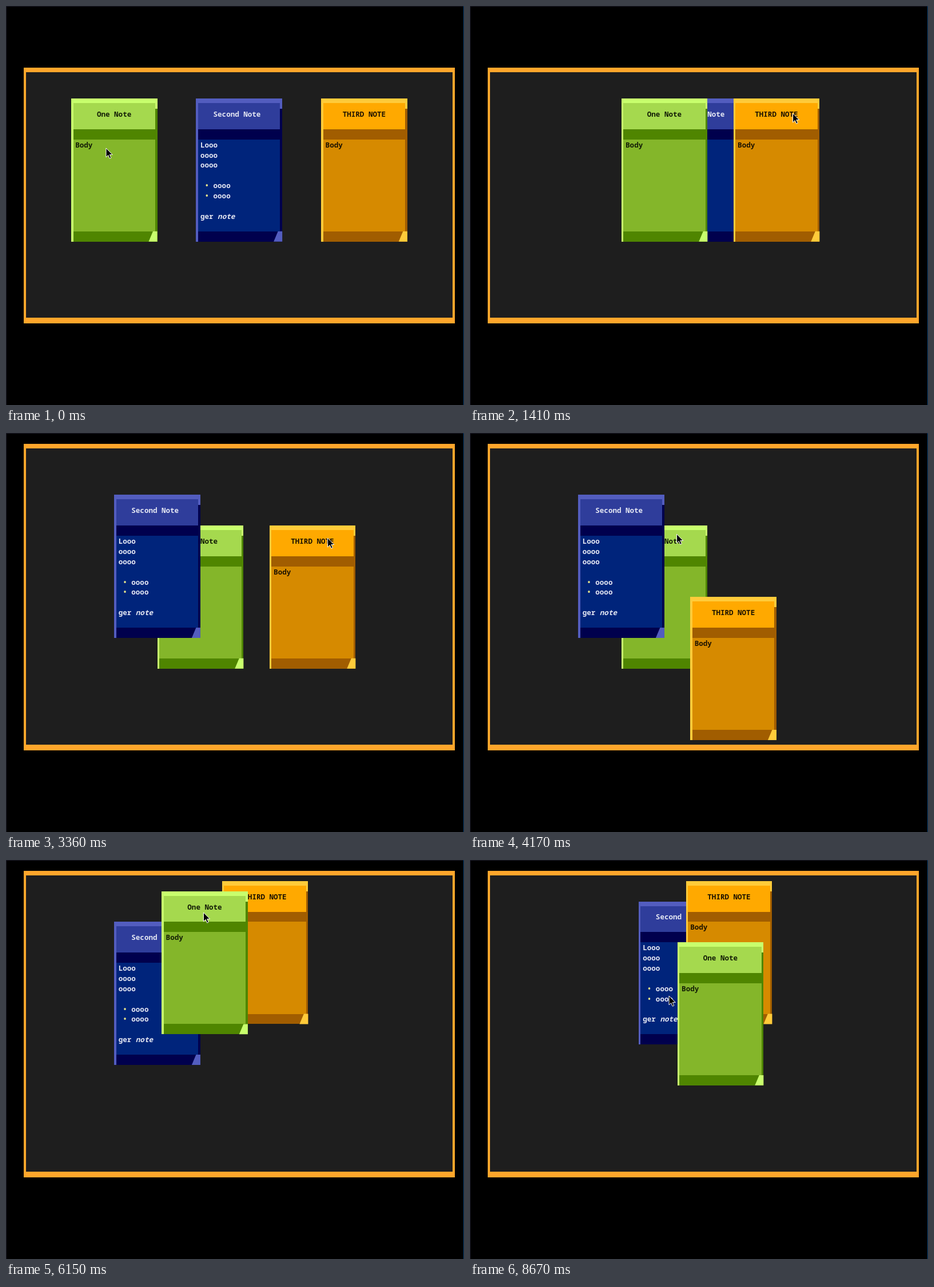
These frames come from a looping animation (801x699 px, 8700 ms). An HTML page:

```html
<!DOCTYPE html>
<html lang="en">
<head>
<meta charset="utf-8">
<title>Sticky notes</title>
<style>
  html, body { margin: 0; width: 100%; height: 100%; overflow: hidden; background: #000; }
  svg { display: block; width: 801px; height: 699px; }
  rect { shape-rendering: crispEdges; }
  text { font: bold 12.56px "Noto Sans Mono", "DejaVu Sans Mono", monospace; }
  .italic { font-style: italic; }
</style>
</head>
<body>
<svg id="stage" viewBox="0 0 801 699"></svg>
<script>
const LOOP = 8700, STEP = 30;
const CELL = [7.54, 17.9], ORIGIN = [0.65, 1];
const HALF = 0.45; // height of the half-block glyphs, in rows
const LAG = 105;   // the notes trail the pointer
const stage = document.getElementById('stage');

function add(parent, tag, attrs, content) {
  const node = document.createElementNS('http://www.w3.org/2000/svg', tag);
  for (const key in attrs) node.setAttribute(key, attrs[key]);
  if (content) node.textContent = content;
  return parent.appendChild(node);
}

const toPixels = cell => cell.map((n, axis) => ORIGIN[axis] + n * CELL[axis]);
const place = (node, [x, y]) => node.setAttribute('transform', `translate(${x} ${y})`);

// Positions and sizes are in terminal cells.
function box(parent, col, row, cols, rows, fill) {
  return add(parent, 'rect', {
    x: col * CELL[0], y: row * CELL[1], width: cols * CELL[0], height: rows * CELL[1], fill
  });
}

function write(parent, col, row, content, fill, style = '') {
  add(parent, 'text', { x: col * CELL[0], y: row * CELL[1] + 14, fill, class: style }, content);
}

function makeNote(layer, { light, title, dark, body, ink, heading, lines }) {
  const g = add(layer, 'g', {});
  box(g, 0, 0, 20, 14, dark);
  box(g, 0, 0, 20, HALF, light);
  box(g, 0, 0, 0.5, 14, light);
  box(g, 19.5, 0, 0.5, 1, light);
  box(g, 0.5, HALF, 19, 3 - HALF, title);
  box(g, 0.5, 4, 19, 9, body);
  const [w, h] = CELL;
  add(g, 'path', { d: `M${19 * w} ${13 * h}H${20 * w}V${14 * h}H${18 * w}Z`, fill: light });
  write(g, Math.floor((20 - heading.length) / 2), 1, heading, ink);
  lines.forEach((line, i) => {
    if (line.startsWith('•')) {
      write(g, 2, 4 + i, '•', '#e6e58a');
      write(g, 4, 4 + i, line.slice(2), ink);
    } else {
      const [plain, slanted] = line.split('*');
      write(g, 1, 4 + i, plain.trim(), ink);
      if (slanted) write(g, 1 + plain.length, 4 + i, slanted, ink, 'italic');
    }
  });
  return g;
}

// Backdrop and canvas frame
add(stage, 'rect', { width: 801, height: 699, fill: '#000' });
add(stage, 'rect', { width: 801, height: 1, fill: '#1b1b28' });
add(stage, 'rect', { width: 1, height: 699, fill: '#1b1b28' });
add(stage, 'rect', { x: 800, width: 1, height: 699, fill: '#0f4478' });
const grid = add(stage, 'g', {});
place(grid, ORIGIN);
const border = box(grid, 4, 6, 100, 25, '#ffa62b');
const inside = box(grid, 4.5, 6 + HALF, 99, 24, '#1e1e1e');
const layer = add(stage, 'g', {});

const notes = {
  green: makeNote(layer, {
    light: '#c8ff6d', title: '#a5d94e', dark: '#4f8500', body: '#84b62a', ink: '#131d06',
    heading: 'One Note', lines: ['Body']
  }),
  blue: makeNote(layer, {
    light: '#535dbf', title: '#2f3d9b', dark: '#00004d', body: '#00247b', ink: '#e4e7f3',
    heading: 'Second Note', lines: ['Looo', 'oooo', 'oooo', '', '• oooo', '• oooo', '', 'ger *note']
  }),
  orange: makeNote(layer, {
    light: '#ffcb3a', title: '#ffa900', dark: '#a15d00', body: '#d68a00', ink: '#1d1300',
    heading: 'THIRD NOTE', lines: ['Body']
  })
};
const pointer = add(stage, 'path', {
  d: 'M0 0V15.8L3.7 12.4L6.2 18.2L8.8 17L6.3 11.4H11.2Z',
  fill: '#000', stroke: '#fff'
});

const home = { green: [15, 9], blue: [44, 9], orange: [73, 9] };
const rest = [175, 249];

// Reach for a note, grab it at a pixel offset, drag it to a cell.
// No "to" is a click; no "reach" continues the drag in hand.
const gestures = [
  { note: 'green', reach: [0, 120], drag: [120, 345], grab: [76, 27], to: [35, 9] },
  { note: 'orange', reach: [600, 780], drag: [780, 960], grab: [104, 26], to: [80, 10] },
  { note: 'orange', drag: [960, 1305], grab: [104, 26], to: [61, 9] },
  { note: 'blue', reach: [1590, 1890], drag: [2010, 2400], grab: [109, 26], to: [34, 2] },
  { note: 'blue', drag: [2400, 2790], grab: [109, 26], to: [25, 6] },
  { note: 'orange', reach: [3180, 3360], drag: [3480, 3795], grab: [102, 22], to: [51, 16] },
  { note: 'green', reach: [3870, 4170], drag: [4380, 4620], grab: [97, 15], to: [36, 3] },
  { note: 'orange', reach: [4650, 4890], drag: [4900, 5450], grab: [82, 25], to: [50, 2] },
  { note: 'green', reach: [5880, 6060], drag: [6090, 6375], grab: [63, 27], to: [48, 8] },
  { note: 'blue', reach: [6480, 6780], drag: [6960, 7140], grab: [53, 4], to: [39, 4] },
  { note: 'orange', reach: [7440, 7620], drag: [7620, 7680], grab: [62, 71] },
  { note: 'green', reach: [7800, 8100], drag: [8100, 8160], grab: [69, 38] }
];

const shift = (a, b) => a.map((n, axis) => n + b[axis]);

function between(a, b, [start, end], time) {
  const u = Math.min(1, Math.max(0, (time - start) / (end - start)));
  const k = u * u * (3 - 2 * u);
  return a.map((n, axis) => n + (b[axis] - n) * k);
}

// Resolve the gestures into pointer strokes and note moves.
const strokes = [], moves = [];
const cells = { ...home };
let spot = rest;
function stroke(to, span) {
  strokes.push({ from: spot, to, span });
  spot = to;
}
for (const { note, reach, drag, grab, to = cells[note] } of gestures) {
  if (reach) stroke(shift(toPixels(cells[note]), grab), reach);
  stroke(shift(toPixels(to), grab), drag);
  moves.push({ note, from: cells[note], to, span: drag });
  cells[note] = to;
}
stroke([348, 238], [8310, 8670]);

function pointerAt(time) {
  const { from, to, span } = strokes.findLast(s => time >= s.span[0]);
  return between(from, to, span, time);
}

function cellAt(note, time) {
  const late = time - LAG;
  const move = moves.findLast(m => m.note === note && late >= m.span[0]);
  return move ? between(move.from, move.to, move.span, late).map(Math.round) : home[note];
}

// The canvas grows when a note is pushed past its top edge, and stays grown.
function topAt(time) {
  let top = 6;
  for (let t = 0; t <= time; t += STEP) {
    for (const name in notes) top = Math.min(top, cellAt(name, t)[1] - 1);
  }
  return top;
}

function setTop(row) {
  border.setAttribute('y', row * CELL[1]);
  border.setAttribute('height', (31 - row) * CELL[1]);
  inside.setAttribute('y', (row + HALF) * CELL[1]);
  inside.setAttribute('height', (30 - row) * CELL[1]);
}

let lastTime = -1;
function draw(time) {
  if (time === lastTime) return;
  lastTime = time;
  const raisedAt = name => moves.findLastIndex(m => m.note === name && time >= m.span[0]);
  const order = Object.keys(notes).sort((a, b) => raisedAt(a) - raisedAt(b));
  for (const name of order) {
    layer.append(notes[name]);
    place(notes[name], toPixels(cellAt(name, time)));
  }
  setTop(topAt(time));
  place(pointer, pointerAt(time));
}

const begin = performance.now();
function tick() {
  const time = (performance.now() - begin) % LOOP;
  draw(Math.floor(time / STEP) * STEP);
  requestAnimationFrame(tick);
}
draw(0);
requestAnimationFrame(tick);
</script>
</body>
</html>
```
